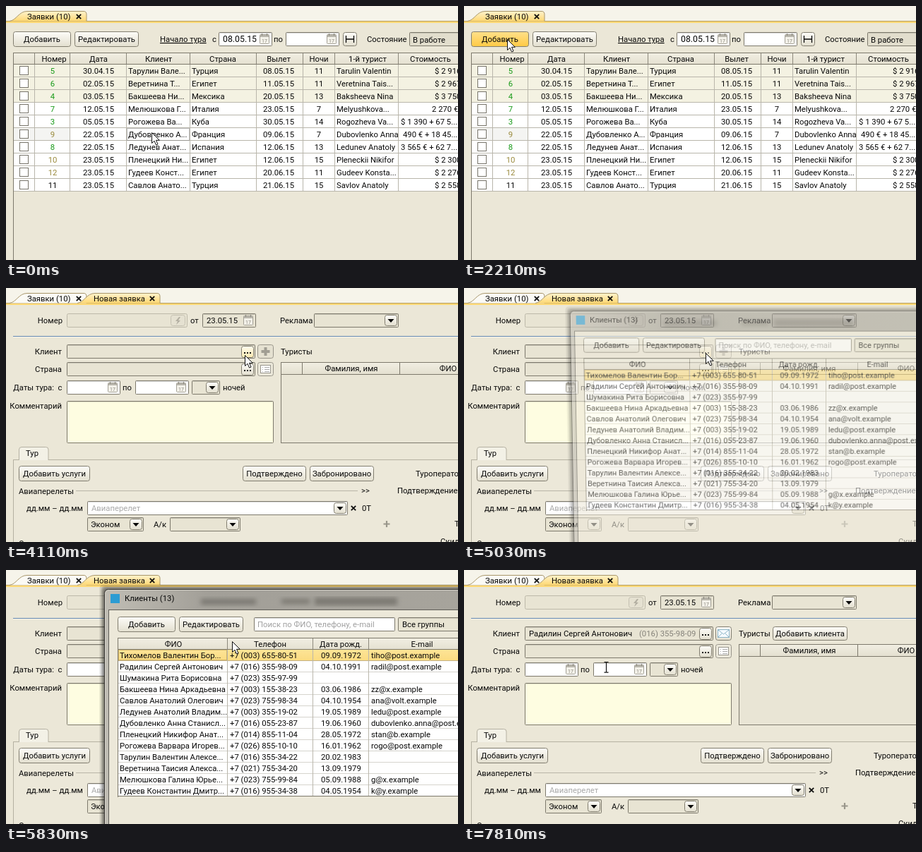
Recreate the animation shown at these times as an HTML page. Size 640 px wide and 360 px high, loop 8 s.

```html
<!DOCTYPE html>
<html lang="ru">
<head>
<meta charset="utf-8">
<style>
html, body { margin: 0; width: 100%; height: 100%; overflow: hidden; background: #ebe7d7; }
#stage { position: absolute; left: 0; top: 0; width: 640px; height: 360px; overflow: hidden; }
svg { position: absolute; left: 0; top: 0; overflow: visible; }
text { font: 11.3px Roboto, sans-serif; white-space: pre; }
#dialog { transform-origin: 487px 193px; }
</style>
</head>
<body>
<div id="stage"></div>
<script>
const INK = '#080808', EDGE = '#7d796c', GRID = '#b9b6ab', BEIGE = '#ebe7d7', FIELD = '#e8e4d3';

// ---- drawing helpers ----
const rect = (x, y, w, h, fill, line = 'none', r = 0) =>
  `<rect x="${x + .5}" y="${y + .5}" width="${w - 1}" height="${h - 1}" rx="${r}" fill="${fill}" stroke="${line}"/>`;
const fill = (x, y, w, h, color) => `<rect x="${x}" y="${y}" width="${w}" height="${h}" fill="${color}"/>`;
const path = (d, line = 'none', color = 'none', width = 1) =>
  `<path d="${d}" stroke="${line}" fill="${color}" stroke-width="${width}"/>`;
const hline = (x, y, to, color) => path(`M${x} ${y + .5}H${to}`, color);
const vline = (x, y, to, color) => path(`M${x + .5} ${y}V${to}`, color);
const text = (x, y, s, color = INK, more = '') => `<text x="${x}" y="${y}" fill="${color}" ${more}>${s}</text>`;
const mid = (x, y, s, color = INK) => text(x, y, s, color, 'text-anchor="middle"');
const end = (x, y, s) => text(x, y, s, INK, 'text-anchor="end"');
const cross = (x, y, r = 3.2) => path(`M${x - r} ${y - r}l${2 * r} ${2 * r}m0 ${-2 * r}l${-2 * r} ${2 * r}`, INK, 'none', 1.7);
const group = (id, s) => `<g id="${id}">${s}</g>`;

const button = (x, y, w, h, s = '', look = 'url(#plain)') =>
  rect(x, y, w, h, look, '#827e70', 3) + (s ? mid(x + w / 2, y + h / 2 + 4, s) : '');
const input = (x, y, w, h, color = '#fff', line = EDGE) =>
  rect(x, y, w, h, color, line, 1) + hline(x + 1, y + 1, x + w - 1, '#0002');
const calendar = (x, y) =>
  rect(x, y + 1, 14, 14, '#f4f2ea', '#a3a096', 1) + fill(x + 1, y + 2, 12, 3, '#b9b6ac') +
  path(`M${x + 3.5} ${y}v3m7 0v-3`, '#88857b') +
  text(x + 7, y + 12.5, '17', '#88857b', 'text-anchor="middle" style="font-size:7px"');
const dateInput = (x, y, h, color, s = '', size = 11.3) =>
  input(x, y, 76, h, color) + calendar(x + 58, y + 2) +
  text(x + 6, y + h / 2 + 4, s, INK, `style="font-size:${size}px"`);
const combo = (x, y, w, h, color, s = '') =>
  input(x, y, w, h, color) + button(x + w - 20, y + 2, 18, h - 4) +
  path(`M${x + w - 15.5} ${y + h / 2 - 2}h9l-4.5 5z`, 'none', INK) + text(x + 5, y + h / 2 + 4, s);
const dots = (x, y, id) =>
  `<g>${rect(x, y, 18, 17, 'url(#plain)', '#827e70', 3).replace('<rect', `<rect id="${id}"`)}` +
  [4, 8, 12].map(d => fill(x + d, y + 9, 2, 2, INK)).join('') + '</g>';

const tab = (x, to, look, s, tx) =>
  path(`M${x} 21.500C${x + 10} 20 ${x + 13} 7.500 ${x + 25} 7.500H${to - 4}Q${to} 7.500 ${to} 12V21.500`, '#a8966a', look) +
  text(tx, 18.6, s) + cross(to - 11, 15);
const strip = () => fill(0, 0, 640, 21, '#f6f4ea') + hline(0, 21, 640, '#b59f62') + fill(0, 22, 640, 2, '#ffd872');

// ---- people ----
const trips = [
  [5, '30.04.15', 'Тарулин Вале...', 'Турция', '08.05.15', 11, 'Tarulin Valentin', '$ 2 916', 607],
  [6, '02.05.15', 'Веретнина Т...', 'Египет', '11.05.15', 11, 'Veretnina Tais...', '$ 2 967', 607],
  [4, '03.05.15', 'Бакшеева Ни...', 'Мексика', '20.05.15', 13, 'Baksheeva Nina', '$ 3 750', 607],
  [7, '12.05.15', 'Мелюшкова Г...', 'Италия', '23.05.15', 7, 'Melyushkova...', '2 270 €', 603],
  [3, '05.05.15', 'Рогожева Ва...', 'Куба', '30.05.15', 14, 'Rogozheva Va...', '$ 1 390 + 67 5...', 559],
  [9, '22.05.15', 'Дубовленко А...', 'Франция', '09.06.15', 7, 'Dubovlenko Anna', '490 € + 18 45...', 562],
  [8, '22.05.15', 'Ледунев Анат...', 'Испания', '12.06.15', 13, 'Ledunev Anatoly', '3 565 € + 62 7...', 559],
  [10, '23.05.15', 'Пленецкий Ни...', 'Египет', '12.06.15', 15, 'Pleneckii Nikifor', '$ 2 300', 607],
  [12, '23.05.15', 'Гудеев Конст...', 'Египет', '20.06.15', 11, 'Gudeev Konsta...', '$ 2 276', 607],
  [11, '23.05.15', 'Савлов Анато...', 'Турция', '21.06.15', 15, 'Savlov Anatoly', '$ 2 558', 607]
];
const clients = [
  ['Тихомелов Валентин Бор...', '003) 655-80-51', '09.09.1972', 'tiho@post.example'],
  ['Радилин Сергей Антонович', '016) 355-98-09', '04.10.1991', 'radil@post.example'],
  ['Шумакина Рита Борисовна', '023) 355-97-99', '', ''],
  ['Бакшеева Нина Аркадьевна', '003) 155-38-23', '03.06.1986', 'zz@x.example'],
  ['Савлов Анатолий Олегович', '023) 755-98-34', '04.10.1954', 'ana@volt.example'],
  ['Ледунев Анатолий Владим...', '003) 355-19-02', '19.05.1989', 'ledu@post.example'],
  ['Дубовленко Анна Станисл...', '016) 055-23-87', '19.06.1960', 'dubovlenko.anna@post.example'],
  ['Пленецкий Никифор Анат...', '014) 855-11-04', '28.05.1972', 'stan@b.example'],
  ['Рогожева Варвара Игорев...', '026) 855-10-10', '16.01.1962', 'rogo@post.example'],
  ['Тарулин Валентин Алексе...', '016) 355-34-22', '20.02.1983', ''],
  ['Веретнина Таисия Алекса...', '021) 755-34-20', '13.09.1979', ''],
  ['Мелюшкова Галина Юрье...', '023) 755-99-84', '05.09.1988', 'g@x.example'],
  ['Гудеев Константин Дмитр...', '016) 955-34-38', '04.05.1954', 'k@y.example']
];

// ---- list of trips ----
function listScene() {
  let s = fill(0, 0, 640, 360, BEIGE) + strip() + tab(5, 114, 'url(#gold)', 'Заявки (10)', 30);
  s += button(10, 36, 82, 22, 'Добавить').replace('<rect', '<rect id="add"') + button(97, 36, 91, 22, 'Редактировать');
  s += text(218, 51, 'Начало тура', INK, 'text-decoration="underline"') + text(292, 51, 'с');
  s += dateInput(301, 37, 20, '#fff', '08.05.15', 12.3) + text(379, 51, 'по') + dateInput(396, 37, 20, '#fff');
  s += button(477, 37, 20, 20) + path('M481.5 42v10M492.5 42v10M482 47h10', INK, 'none', 1.3);
  s += text(511, 51, 'Состояние') + input(571, 37, 90, 20, '#e2decd') + text(576, 52, 'В работе');

  s += fill(10, 67, 630, 16, 'url(#head)');
  trips.forEach((t, i) => {
    const y = 83 + 18 * i, b = y + 12.5;
    const hue = t[0] === 11 ? INK : t[0] > 8 ? '#99893a' : '#189a18';
    s += fill(11, y, 629, 18, i < 3 ? '#f4f2e2' : '#fff');
    if (i === 5) s += fill(11, y, 79, 18, '#f4f4f2');
    s += rect(19, y + 2, 13, 13, '#fff', '#77746a') + hline(11, y + 17, 640, GRID);
    s += mid(66, b, t[0], hue) + mid(131, b, t[1]) + text(173, b, t[2]) + text(263, b, t[3]);
    s += mid(386, b, t[4]) + mid(443, b, t[5]) + text(468, b, t[6]) + text(t[8], b, t[7]);
  });
  const heads = ['Номер', 'Дата', 'Клиент', 'Страна', 'Вылет', 'Ночи', '1-й турист', 'Стоимость'];
  [68, 131, 216, 307, 386, 443, 512, 601].forEach((x, i) => s += mid(x, 79, heads[i]));
  [40, 90, 170, 260, 354, 420, 465, 555].forEach(x => s += vline(x, 67, 263, GRID) + vline(x, 67, 83, '#8d897c'));
  s += hline(10, 66, 640, EDGE) + hline(10, 82, 640, EDGE) + vline(10, 66, 360, EDGE);
  return s + group('focus', `<rect x="171.5" y="173.5" width="88" height="17" fill="none" stroke="#777" stroke-dasharray="1 1"/>`);
}

// ---- new trip form ----
function formScene() {
  let s = fill(0, 0, 640, 360, BEIGE) + strip();
  s += tab(5, 114, '#fbfaf5', 'Заявки (10)', 30) + tab(101, 218, 'url(#gold)', 'Новая заявка', 124);
  s += end(80, 50, 'Номер') + rect(86, 36, 171, 20, FIELD, '#bdb9a9', 2) + rect(233, 38, 21, 16, '#e5e1d1', '#c4c0b1', 3);
  s += path('M245 41l-5 6h3l-2 5 6-6h-3l3-5z', 'none', '#b3afa2');
  s += text(261, 50, 'от') + dateInput(278, 36, 20, FIELD, '23.05.15') + text(388, 50, 'Реклама') + combo(436, 36, 120, 20, FIELD);
  s += hline(10, 68, 640, '#6487b0') + hline(10, 69, 640, '#f8f6ec');

  s += end(79, 94, 'Клиент') + input(86, 80, 267, 20, FIELD) + dots(333, 82, 'pick');
  s += end(79, 119, 'Страна') + input(86, 105, 267, 20, FIELD) + dots(333, 107, 'land');
  s += group('plus', rect(356, 80, 23, 20, '#e5e1d1', '#99958a', 3) + path('M367.5 84v12M361.5 90h12', '#a19e93', 'none', 4));
  s += rect(356, 105, 23, 20, '#ebe8da', '#99958a', 3) + rect(360, 109, 15, 12, '#fff', '#99968c') +
    path('M363 112.5h1m2 0h7M363 115.5h1m2 0h7M363 118.5h1m2 0h7', '#aaa');
  s += group('chosen', text(92, 94, clients[1][0]) + text(248, 94, '(016) 355-98-09', '#85827a') +
    button(356, 80, 23, 20) + rect(359, 84, 17, 12, '#f5fbff', '#8cb4c6') + path('M360 85l7.5 6 7.5-6M360 95l5-5m10 5l-5-5', '#8cb4c6') +
    button(437, 80, 106, 20, 'Добавить клиента'));
  s += text(389, 94, 'Туристы') + rect(389, 105, 260, 115, '#e9e5d5', EDGE) + fill(390, 106, 250, 16, 'url(#head)') + hline(390, 122, 640, EDGE);
  s += vline(419, 106, 122, EDGE) + vline(557, 106, 122, EDGE) + mid(489, 118, 'Фамилия, имя') + mid(626, 118, 'ФИО');

  s += end(79.5, 145, 'Даты тура:  с') + dateInput(86, 131, 20, '#fff') + text(165, 145, 'по') + dateInput(183, 131, 20, '#fff');
  s += combo(263, 131, 40, 20, FIELD) + text(307, 145, 'ночей');
  s += end(79, 171, 'Комментарий') + input(86, 160, 293, 60, '#fefde1');

  s += rect(10, 243, 650, 140, '#ece8d9', '#b5b1a2') + path('M18.5 244V229q0-3.500 3.500-3.500H56.500q3.500 0 3.500 3.500V244', '#b5b1a2', '#f3f1e6');
  s += text(28, 238, 'Тур') + button(18, 252, 101, 22, 'Добавить услуги');
  s += button(335, 252, 90, 22, 'Подтверждено') + button(430, 252, 91, 22, 'Забронировано') + text(580, 267, 'Туроператор');
  s += text(18, 292, 'Авиаперелеты') + hline(99, 287, 498, '#b9b5a7') + text(503, 291, '&gt;&gt;') + text(554, 291, 'Подтверждение');
  s += end(109, 316, 'дд.мм – дд.мм') + combo(115, 302, 369, 20, '#fff') + text(121, 316, 'Авиаперелет', '#a9a9a9');
  s += cross(492, 312) + text(504, 316, '0T', INK, 'font-weight="700"');
  s += combo(115, 325, 80, 20, FIELD, 'Эконом') + text(209, 339, 'А/к') + combo(232, 325, 100, 20, FIELD);
  s += path('M539 330v9M534.5 334.500h9', '#99968b', 'none', 2.200) + text(635, 338, 'Т') + text(615, 363, 'Скидка');
  return s + text(18, 366, 'Отели');
}

// ---- clients dialog ----
function dialogScene() {
  const frame = d => `M${139.5 - d} 370V${33.5 - d}q0-6 6-6H720V370z`;
  let s = [7, 5, 4, 3, 2, 1].map(d => path(frame(d), 'none', '#0000001c')).join('');
  s += path(frame(0), '#3d3b37', 'url(#glass)') + path(frame(-1), '#d5d2c9');
  s += `<g filter="url(#blur)" fill="#55534e" opacity=".5"><rect x="276" y="41" width="78" height="8"/><rect x="390" y="41" width="40" height="7"/><rect x="437" y="39" width="117" height="11"/></g>`;
  s += fill(145, 56, 575, 314, '#5f5d57') + fill(146, 57, 574, 313, '#ece8d9');
  s += fill(148, 34, 13, 13, '#2c9cd3') + text(168, 44, 'Клиенты (13)');
  s += button(158, 66, 82, 22, 'Добавить') + button(245, 66, 91, 22, 'Редактировать');
  s += input(351, 67, 200, 20) + text(356, 81, 'Поиск по ФИО, телефону, e-mail', '#a0a0a0');
  s += input(555, 67, 160, 20, FIELD) + text(561, 81, 'Все группы');
  s += fill(158, 97, 562, 16, 'url(#head)') + fill(159, 113, 561, 208, '#fff');
  s += group('pickRow', fill(159, 113, 561, 16, 'url(#row)') + hline(159, 128, 720, '#d3a94c') +
    `<rect x="159.500" y="113.500" width="153" height="14" fill="none" stroke="#a98a45" stroke-dasharray="1 1"/>`);
  clients.forEach((c, i) => {
    const b = 125 + 16 * i;
    s += hline(159, 128 + 16 * i, 720, '#bbb8ad99');
    s += text(161, b, c[0], INK, `id="who${i}"`) + text(317, b, '+7 (' + c[1]) + text(446, b, c[2]) + text(517, b, c[3]);
  });
  [313, 434, 513].forEach(x => s += vline(x, 97, 321, GRID) + vline(x, 97, 113, '#8d897c'));
  s += mid(237, 109, 'ФИО') + mid(374, 109, 'Телефон') + mid(474, 109, 'Дата рожд.') + mid(589, 109, 'E-mail');
  return s + hline(158, 96, 720, EDGE) + hline(158, 112, 720, EDGE) + vline(158, 96, 322, EDGE) + hline(158, 320, 720, EDGE);
}

const fade = (id, a, b) =>
  `<linearGradient id="${id}" x2="0" y2="1"><stop stop-color="${a}"/><stop offset="1" stop-color="${b}"/></linearGradient>`;
const defs = '<defs>' + fade('plain', '#fdfcf8', '#e3dfcf') + fade('hot', '#ffe08a', '#ffca45') + fade('warm', '#fffdf0', '#fbe9b0') +
  fade('gold', '#fff3cd', '#ffd872') + fade('head', '#f1eee2', '#e4e0d0') + fade('row', '#fde496', '#fbdb80') +
  '<linearGradient id="glass"><stop stop-color="#c0bdb4"/><stop offset=".25" stop-color="#a29f98"/><stop offset="1" stop-color="#a8a59d"/></linearGradient>' +
  '<filter id="blur"><feGaussianBlur stdDeviation="3"/></filter></defs>';
const layer = (id, s) => `<svg id="${id}" width="640" height="360">${s}</svg>`;
const arrow = path('M.5.5V15.500L4 12.200 6.500 18 9 17 6.500 11.300H11.300z', '#111', '#fff');
const beam = path('M-3-7.500h2.500q.5 0 .5.800v13q0 .8-.5.800H-3M3-7.500H.5Q0-7.500 0-6.700M0 6.300q0 .8.500.800H3', '#111', 'none', 1.200);

document.getElementById('stage').innerHTML =
  layer('base', defs + group('list', listScene()) + group('form', formScene())) + layer('dialog', dialogScene()) +
  layer('top', '<circle id="ring" cx="200.500" cy="137.500" r="9.500" fill="none" stroke="#222"/>' + group('arrow', arrow) + group('beam', beam));

// ---- timeline ----
const LOOP = 8000;
const moves = [
  [0, 206, 179], [810, 201, 175], [960, 153, 134], [1080, 107, 93], [1230, 82, 63], [1390, 69, 52],
  [1530, 65, 50], [1650, 63, 48], [1780, 61, 47], [3160, 77, 57], [3300, 106, 67], [3430, 138, 79],
  [3580, 221, 84], [3720, 262, 95], [3850, 299, 101], [3990, 324, 99], [4110, 338, 95], [4240, 341, 93],
  [4360, 342, 92], [5830, 320, 101], [5950, 283, 112], [6090, 255, 121], [6220, 230, 130],
  [6370, 212, 134], [6500, 201, 136], [6650, 200, 136]
];
// time, opacity, scale, tilt
const opening = [
  [0, 0, 1, 0], [4780, .08, .93, 5], [4910, .3, .945, 4], [5030, .6, .961, 3], [5150, .9, .985, 1],
  [5290, 1, 1, 0], [7680, .45, .96, 3], [7810, 0, 1, 0]
];
const at = (keys, t) => keys.filter(k => k[0] <= t).pop();
const $ = id => document.getElementById(id);
const show = (id, on) => $(id).style.display = on ? '' : 'none';
const paint = (id, look) => $(id).setAttribute('fill', `url(#${look})`);

function draw(t) {
  const [, x, y] = at(moves, t), [, alpha, scale, tilt] = at(opening, t);
  const second = t >= 7260, done = t >= 7680;
  show('list', t < 2330);
  show('form', t >= 2330);
  show('focus', t < 2210);
  paint('add', t >= 1390 ? 'hot' : 'plain');
  paint('pick', t >= 4110 && t < 5290 ? 'warm' : 'plain');
  show('plus', !done);
  show('chosen', done);

  show('dialog', alpha > 0);
  $('dialog').style.opacity = alpha;
  $('dialog').style.transform = scale < 1 ? `perspective(1000px) rotateX(${-tilt}deg) scale(${scale})` : 'none';
  $('pickRow').setAttribute('transform', `translate(0 ${second ? 16 : 0})`);
  $('who1').textContent = second ? 'Радилин Сергей Антоно...' : clients[1][0];

  show('ring', (second && t < 7390) || (t >= 7540 && !done));
  show('arrow', t < 7810);
  show('beam', t >= 7810);
  $('arrow').setAttribute('transform', `translate(${x} ${y})`);
  $('beam').setAttribute('transform', 'translate(201.500 138)');
}

const start = performance.now();
function tick() {
  draw((performance.now() - start) % LOOP);
  requestAnimationFrame(tick);
}
tick();
</script>
</body>
</html>
```
